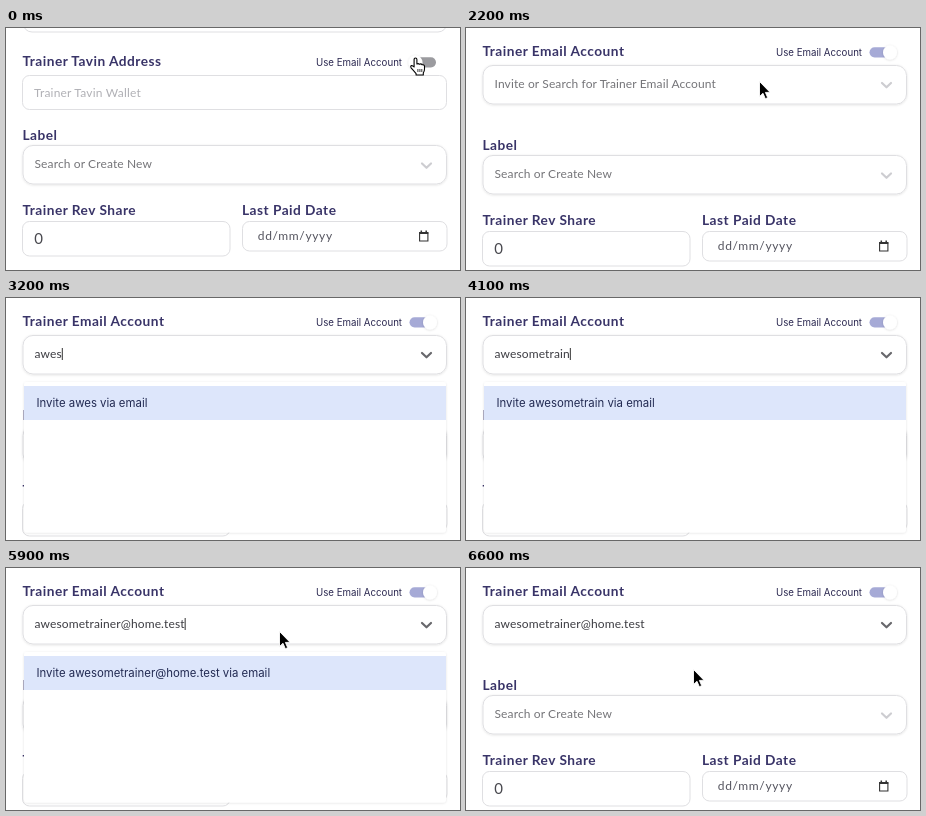
These frames come from a looping animation (454 px wide and 242 px high, 7300 ms). An HTML page:

```html
<!DOCTYPE html>
<html lang="en">
<head>
<meta charset="utf-8">
<title>Trainer form</title>
<style>
html, body { margin: 0; width: 100%; height: 100%; overflow: hidden; background: #fff; }
svg { display: block; width: 100vw; height: 100vh; }
text { font-family: Lato, sans-serif; font-size: 12px; letter-spacing: .12px; fill: #747478; white-space: pre; }
.head { font-size: 13.7px; font-weight: 700; letter-spacing: .48px; fill: #393468; }
.ui { font-family: Inter, sans-serif; font-size: 9.7px; letter-spacing: 0; fill: #2b2850; }
.option { font-family: Inter, sans-serif; font-size: 11.4px; letter-spacing: 0; fill: #222a52; }
.hint { fill: #b0b0b5; letter-spacing: .2px; }
.date { letter-spacing: .65px; fill: #55555f; }
.num { font-size: 15px; fill: #48484e; }
.value { fill: #3c3c42; }
.box { fill: #fff; stroke: #dfdfe2; }
.chev { fill: none; stroke: #cdcdd1; stroke-width: 2.2; stroke-linecap: round; stroke-linejoin: round; }
</style>
</head>
<body>
<svg viewBox="0 0 454 242">
  <defs>
    <filter id="soft" x="-10%" y="-10%" width="120%" height="125%">
      <feDropShadow dx="0" dy=".6" stdDeviation="1" flood-color="#000" flood-opacity=".12"/>
    </filter>
    <filter id="knobShade" x="-40%" y="-40%" width="180%" height="180%">
      <feDropShadow dx="0" dy=".5" stdDeviation=".8" flood-color="#000" flood-opacity=".16"/>
    </filter>
  </defs>

  <rect id="above" class="box" x="17" y="-35" width="424" height="39" rx="9"/>

  <g id="wallet">
    <text class="head" x="16.5" y="38">Trainer Tavin Address</text>
    <rect class="box" x="16.5" y="47.5" width="424" height="34" rx="7"/>
    <text class="hint" x="28" y="69">Trainer Tavin Wallet</text>
  </g>

  <g id="email">
    <text class="head" x="16.5" y="28">Trainer Email Account</text>
    <rect class="box" x="17" y="37.5" width="423.5" height="38.5" rx="10" filter="url(#soft)"/>
    <text id="typed" x="28.5" y="59.6"></text>
    <path id="caret" d="M0 50V62" stroke="#333" stroke-width="1"/>
    <path id="chev" class="chev" d="M416 55L420.5 59.3 425 55"/>
  </g>

  <g id="switch">
    <text class="ui" x="310" y="27.5">Use Email Account</text>
    <rect id="track" x="403.5" y="19.2" width="26.5" height="10.2" rx="5.1"/>
    <circle id="knob" cy="24.5" r="7" fill="#fff" filter="url(#knobShade)"/>
  </g>

  <g id="rest">
    <text class="head" x="16.5" y="122">Label</text>
    <rect class="box" x="17" y="127.5" width="423.5" height="38.5" rx="10" filter="url(#soft)"/>
    <text x="28.5" y="150" letter-spacing=".2">Search or Create New</text>
    <path class="chev" d="M416 145.5L420.5 149.8 425 145.5"/>
    <text class="head" x="16.5" y="197">Trainer Rev Share</text>
    <rect class="box" x="16.5" y="203.5" width="207.5" height="34.5" rx="7"/>
    <text class="num" x="28.3" y="226">0</text>
    <text class="head" x="236" y="197">Last Paid Date</text>
    <rect class="box" x="236.5" y="203.5" width="204.5" height="29.5" rx="7"/>
    <text class="date" x="251.8" y="221.5">dd/mm/yyyy</text>
    <path d="M413.6 214.5H421.9V223H413.6Z" fill="none" stroke="#333" stroke-width="1.1"/>
    <path d="M413.2 215.2H422.3M415.3 212.5V215M420.2 212.5V215" stroke="#333" stroke-width="1.5"/>
  </g>

  <g id="menu">
    <rect x="18" y="84" width="422" height="150.5" rx="3" fill="#fff" filter="url(#soft)"/>
    <rect x="18" y="88" width="422" height="34" fill="#dde6fb"/>
    <text id="option" class="option" x="30.5" y="109"></text>
  </g>

  <path id="arrow" d="M0 0V15L3.5 11.8 5.8 17.2 8.2 16.2 5.9 10.9H10.6Z" fill="#000" stroke="#fff" stroke-width=".9"/>
  <g id="hand" fill="#fff" stroke="#000" stroke-width="1.1" stroke-linejoin="round">
    <path d="M-1.4 9V1.6Q-1.4 0 0 0T1.4 1.6V6Q2.7 5 4 6.3 5.5 5.3 6.7 6.8 8.7 6.4 9 8.2V11Q9 13.3 7.8 14.8V17H.6V15.6Q-1.6 12.8-4.4 9.8-5.3 8.2-4 7.6-2.8 7.4-1.4 9Z"/>
    <path d="M2.4 11V14M4.4 11V14M6.3 11V14" stroke-width=".8"/>
  </g>
</svg>
<script>
const LOOP = 7300, TICK = 100;
const ADDRESS = "awesometrainer@home.test";
const SWITCH_AT = 1200, FOCUS_AT = 2500, OPEN_AT = 2700, PICK_AT = 6300;
const $ = id => document.getElementById(id);
const show = (id, on) => $(id).setAttribute("display", on ? "inline" : "none");
const put = (id, x, y) => $(id).setAttribute("transform", `translate(${x} ${y})`);

// [start, characters present at start, last tick]; one more per tick
const bursts = [
  [2700, 1, 2700], [2900, 2, 3000], [3200, 4, 3400], [3600, 7, 4100],
  [4300, 14, 4300], [4500, 15, 4500], [4800, 16, 5600]
];
// [time, x, y] of the pointer tip
const track = [
  [0, 409.5, 30], [1400, 409.5, 30], [1900, 302, 49], [2200, 293.5, 53.5],
  [2500, 288, 52], [5700, 288, 52], [5900, 273.5, 63.5],
  [6200, 229, 98], [6400, 227.5, 101.5], [LOOP, 227.5, 101.5]
];

function typedCount(t) {
  let n = 0;
  for (const [start, first, last] of bursts)
    if (t >= start) n = first + (Math.min(t, last) - start) / TICK;
  return n;
}

function pointer(t) {
  const i = track.findIndex(k => k[0] > t);
  const [t0, x0, y0] = track[i - 1], [t1, x1, y1] = track[i];
  const u = (t - t0) / (t1 - t0);
  return [x0 + (x1 - x0) * u, y0 + (y1 - y0) * u];
}

function draw(t) {
  const on = t >= SWITCH_AT, focused = t >= FOCUS_AT;
  const picked = t >= PICK_AT, open = t >= OPEN_AT && !picked;
  const text = ADDRESS.slice(0, typedCount(t));

  show("above", !on);
  show("wallet", !on);
  show("email", on);
  put("switch", 0, on ? 0 : 10);
  put("rest", 0, on ? 0 : -10);

  const slide = Math.min(1, Math.max(0, (t - SWITCH_AT) / 200));
  $("knob").setAttribute("cx", 409.5 + 14.5 * slide);
  $("track").setAttribute("fill", slide < 1 ? (slide ? "#a3a3b0" : "#9b9b9f") : "#a6aad6");

  $("typed").textContent = text || "Invite or Search for Trainer Email Account";
  $("typed").setAttribute("class", text ? "value" : "");
  $("chev").style.stroke = focused ? "#68686c" : "";
  show("caret", focused && !picked);
  if (on) put("caret", 29 + (text ? $("typed").getComputedTextLength() : 0), 0);

  show("menu", open);
  $("option").textContent = `Invite ${text} via email`;

  const [x, y] = pointer(t), hand = t < 1500;
  show("hand", hand);
  show("arrow", !hand && (t < OPEN_AT || t >= 5700));
  put("hand", x, y);
  put("arrow", x, y);
}

let start, shown = -1;
function frame(now) {
  start ??= now;
  const t = Math.floor(((now - start) % LOOP) / TICK) * TICK;
  if (t !== shown) draw(shown = t);
  requestAnimationFrame(frame);
}
draw(0);
requestAnimationFrame(frame);
</script>
</body>
</html>
```
